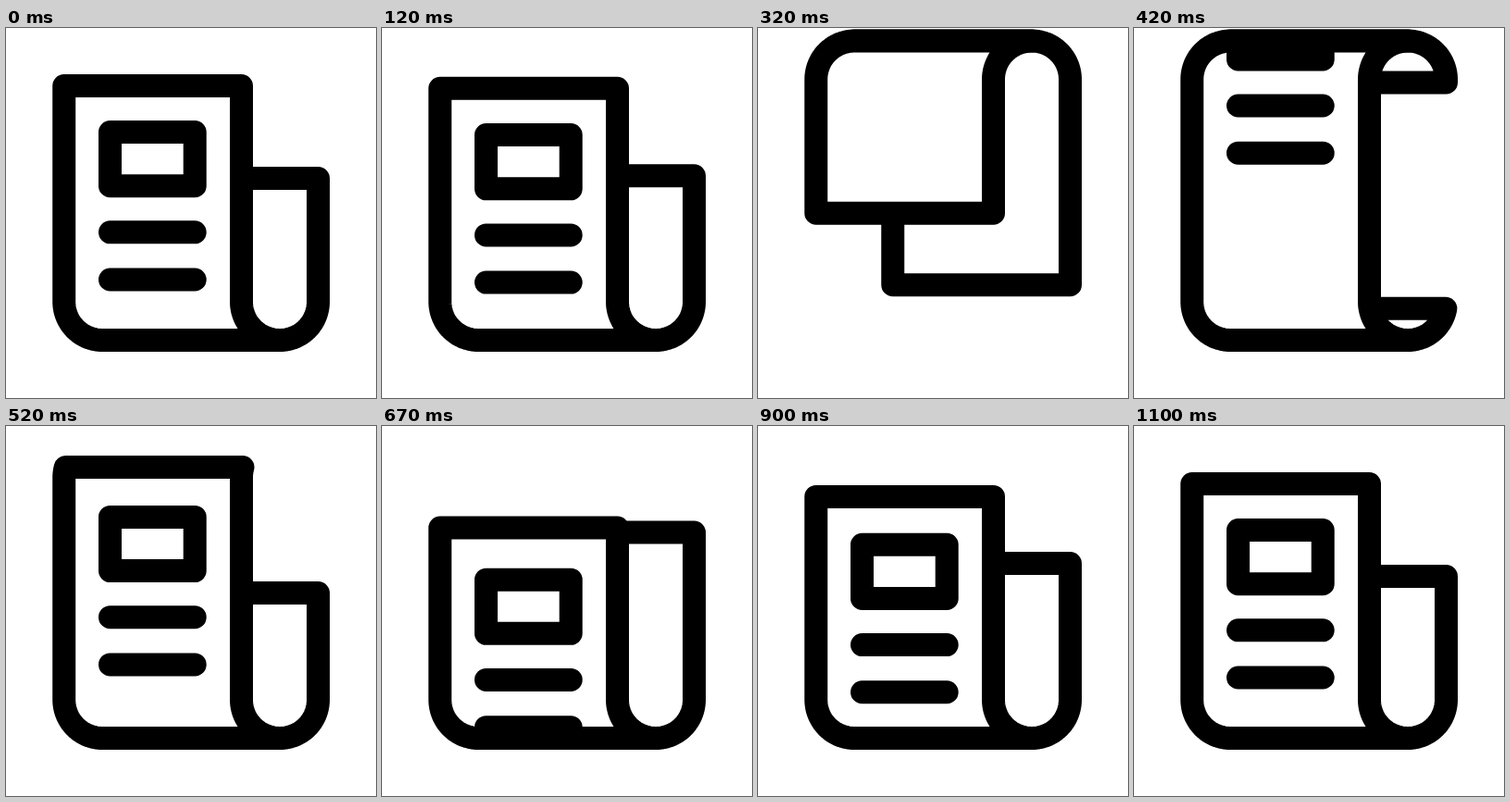
Animation of 400 by 400 pixels, one loop 1120 ms. Source, as an HTML page with a canvas:

```html
<!DOCTYPE html>
<html>
<head>
<meta charset="utf-8">
<title>Rolling newspaper</title>
<style>
html, body { margin: 0; width: 100%; height: 100%; overflow: hidden; background: #fff; }
canvas { display: block; }
</style>
</head>
<body>
<canvas id="stage" width="400" height="400"></canvas>
<script>
const ctx = document.getElementById('stage').getContext('2d');
const LOOP = 1120;

// The sheet runs round two rollers, down the front and up the back.
const R = 41.5, MID_X = 296, MID_Y = 175.75;
const STRAIGHT = 240.5, QUARTER = Math.PI * R / 2;
const HALF = STRAIGHT + 2 * QUARTER, TRACK = 2 * HALF;
const WIDTH = 191.75;              // sheet width
const LENGTH = 497.4;              // sheet length along the track
const START = QUARTER + 7;         // resting place of the sheet's tail
const OVERSHOOT = 49;

// Right edge of the track; the back half is the front half turned by 180 degrees.
function trackPoint(q, back) {
  let x = -R, y = q - HALF / 2;
  const bend = Math.abs(y) - STRAIGHT / 2;
  if (bend > 0) {
    x = -R * Math.cos(bend / R);
    y = Math.sign(y) * (STRAIGHT / 2 + R * Math.sin(bend / R));
  }
  const side = back ? -1 : 1;
  return [MID_X + side * x, MID_Y + side * y];
}

function drawPanel(from, to, back) {
  from = Math.max(from, 0);
  to = Math.min(to, HALF);
  if (to <= from) return;
  const steps = Math.ceil((to - from) / 2);
  const edge = Array.from({ length: steps + 1 },
    (_, i) => trackPoint(from + (to - from) * i / steps, back));
  ctx.beginPath();
  for (const [x, y] of edge) ctx.lineTo(x, y);
  for (const [x, y] of edge.reverse()) ctx.lineTo(x - WIDTH, y);
  ctx.closePath();
  ctx.fill();
  ctx.stroke();
}

function drawSide(tail, back) {
  const offset = back ? HALF : 0;
  for (const turn of [0, TRACK]) {
    const from = tail - offset - turn;
    drawPanel(from, from + LENGTH, back);
  }
}

function drawPrint(shift) {
  ctx.save();
  ctx.beginPath();
  ctx.rect(0, 14, 400, 348);
  ctx.clip();
  ctx.beginPath();
  if (170.7 + shift < 358) ctx.rect(112.5, 112.5 + shift, 91.7, 58.2);
  for (const y of [220.8, 272]) {
    if (y + shift > 358) continue;
    ctx.moveTo(112.5, y + shift);
    ctx.lineTo(204.2, y + shift);
  }
  ctx.stroke();
  ctx.restore();
}

// Cubic ease with handles at one third: x = s - s^2 + s^3, y = 3s^2 - 2s^3.
function ease(x) {
  x = Math.min(1, Math.max(0, x));
  let s = x;
  for (let i = 0; i < 8; i++) s -= (s - s * s + s * s * s - x) / (1 - 2 * s + 3 * s * s);
  return s * s * (3 - 2 * s);
}

function travel(t) {
  if (t < 700) return (TRACK + OVERSHOOT) * ease((t - 100) / 600);
  return t >= 1100 ? TRACK : TRACK + OVERSHOOT * (1 - ease((t - 700) / 400));
}

function draw(t) {
  const moved = travel(t);
  const tail = START + moved % TRACK;
  const offset = moved < HALF ? moved : moved - TRACK;
  ctx.fillStyle = '#fff';
  ctx.fillRect(0, 0, 400, 400);
  ctx.strokeStyle = '#000';
  ctx.lineWidth = 25;
  ctx.lineJoin = ctx.lineCap = 'round';
  drawSide(tail, true);
  drawSide(tail, false);
  drawPrint(offset > 0 ? offset * 1.13 : Math.min(0, offset + 4));
}

// The motion advances in alternating steps of 20 and 30 ms.
const stepped = t => t - t % 50 + (t % 50 >= 20 ? 20 : 0);

function tick() {
  draw(stepped(performance.now() % LOOP));
  requestAnimationFrame(tick);
}
tick();
</script>
</body>
</html>
```
